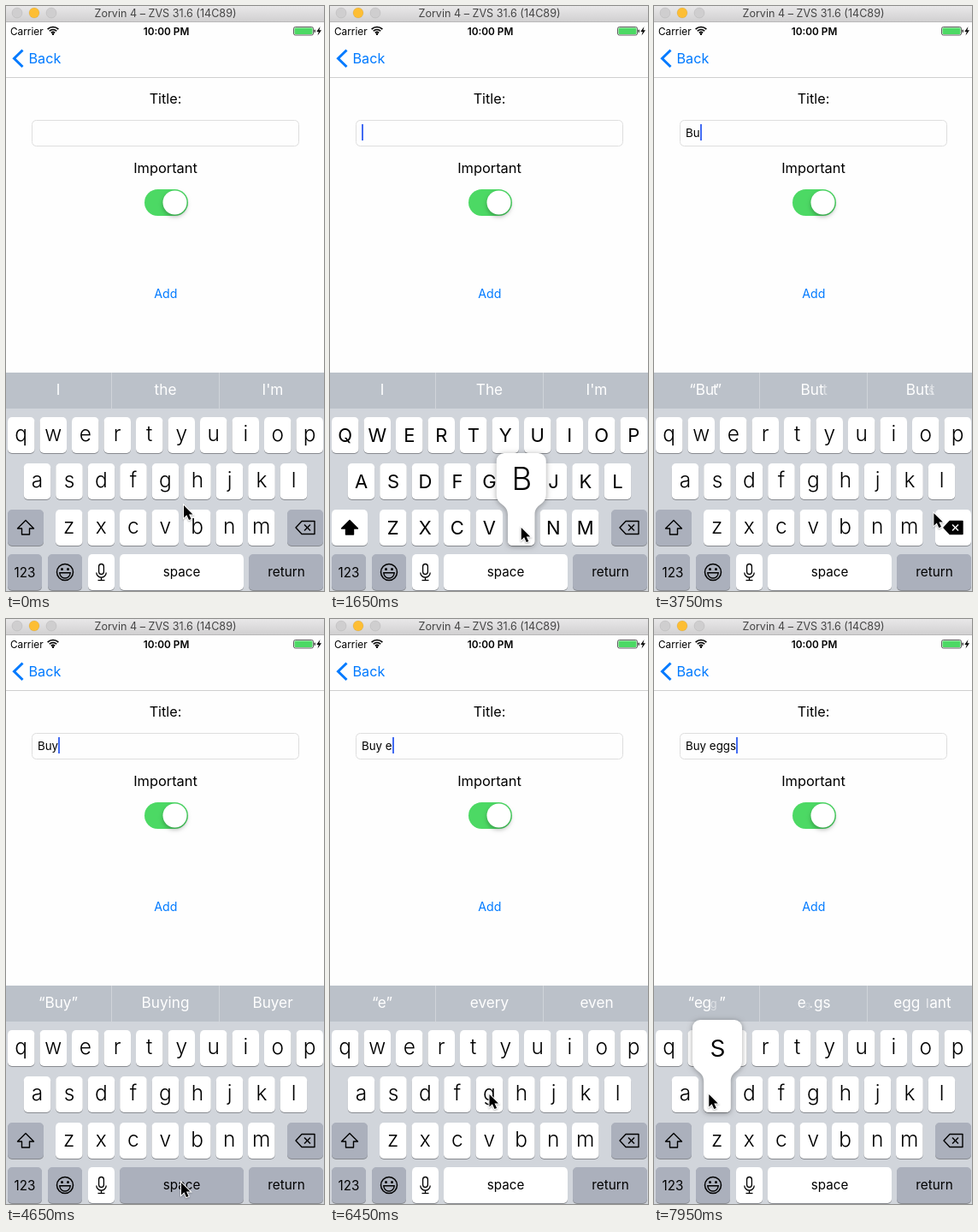
Animation, 372 px wide and 683 px high, one loop 8 s. Source, as an HTML page with a canvas:

```html
<!DOCTYPE html>
<html lang="en">
<head>
<meta charset="utf-8">
<title>New task</title>
<style>
html, body { margin: 0; width: 100%; height: 100%; overflow: hidden; background: #fff; }
canvas { display: block; width: 372px; height: 683px; }
</style>
</head>
<body>
<canvas id="stage" width="372" height="683"></canvas>
<script>
const ctx = document.getElementById('stage').getContext('2d');
const LOOP = 8000, STEP = 150, HOLD = 300, GLIDE = 750;
const FONT = 'Inter, Roboto, "Liberation Sans", sans-serif';
const BLUE = '#007aff', GREEN = '#4cd964', GRAY_KEY = '#abb0bc';
const ROWS = ['qwertyuiop', 'asdfghjkl', 'zxcvbnm'];
const ROW_X = [17.75, 36.5, 73.75], ROW_TOP = 480, ROW_GAP = 54, PITCH = 37.5;
const WIDE_KEYS = { shift: [23, 609], delete: [350, 609], space: [205, 658], return: [345, 653] };

// Key presses drive the text, the suggestions and the pointer.
const presses = [['shift', 450], ['b', 1650], ['u', 2100], ['t', 2550], ['return', 3000],
  ['delete', 3600], ['y', 4200], ['space', 4650], ['e', 5400], ['g', 6900], ['g', 7650],
  ['s', 7800], ['a', 8250]];

const suggestions = {
  '': ['I', 'the', "I'm"], shift: ['I', 'The', "I'm"], B: ['“B”', 'But', 'Be'],
  Bu: ['“Bu”', 'But', 'Buts'], But: ['“But”', 'Butt', 'Butt'], Buy: ['“Buy”', 'Buying', 'Buyer'],
  'Buy ': ['me', 'it', 'the'], 'Buy e': ['“e”', 'every', 'even'],
  'Buy eg': ['“eg”', 'e.g.', 'eggs'], 'Buy egg': ['“egg”', 'eggs', 'eggplant']
};

const lerp = (a, b, p) => a + (b - a) * p;
const clamp = p => Math.max(0, Math.min(1, p));
const smooth = p => p * p * (3 - 2 * p);
const isDown = (key, t) => presses.some(([k, at]) => k === key && t >= at && t < at + HOLD);

function keyCenter(key) {
  if (WIDE_KEYS[key]) return WIDE_KEYS[key];
  const r = ROWS.findIndex(row => row.includes(key));
  return [ROW_X[r] + ROWS[r].indexOf(key) * PITCH, ROW_TOP + r * ROW_GAP + 21];
}

function typeKey(value, key) {
  if (key === 'delete') return value.slice(0, -1);
  if (key === 'space') return value + ' ';
  if (key.length > 1) return value;
  return value + (value ? key : key.toUpperCase());
}

const history = [{ at: -LOOP, value: '', caps: false, words: suggestions[''], before: suggestions[''], since: -LOOP }];
for (const [key, time] of presses) {
  const last = history.at(-1), at = time + STEP;
  const value = typeKey(last.value, key), caps = key === 'shift';
  const words = suggestions[caps ? 'shift' : value] || last.words;
  const changed = words !== last.words;
  history.push({ at, value, caps, words,
    before: changed ? last.words : last.before, since: changed ? at : last.since });
}

const start = [208, 583];
function pointerAt(t) {
  let from = start, left = 0;
  for (const [key, at] of presses) {
    const to = keyCenter(key);
    if (t <= at) {
      const p = smooth(clamp((t - left) / Math.min(GLIDE, at - left)));
      return [lerp(from[0], to[0], p), lerp(from[1], to[1], p)];
    }
    from = to;
    left = at;
  }
  return from;
}

function text(str, x, y, size, color = '#000', align = 'center', weight = 400) {
  ctx.font = `${weight} ${size}px ${FONT}`;
  ctx.textAlign = align;
  ctx.fillStyle = color;
  ctx.fillText(str, x, y);
}

function rect(x, y, w, h, color, r = 0) {
  ctx.beginPath();
  ctx.roundRect(x, y, w, h, r);
  ctx.fillStyle = color;
  ctx.fill();
}

function dot(x, y, r, color) {
  ctx.beginPath();
  ctx.arc(x, y, r, 0, Math.PI * 2);
  ctx.fillStyle = color;
  ctx.fill();
}

function path(points, closed = true) {
  ctx.beginPath();
  points.forEach(([x, y]) => ctx.lineTo(x, y));
  if (closed) ctx.closePath();
}

function stroke(color, width) {
  ctx.strokeStyle = color;
  ctx.lineWidth = width;
  ctx.stroke();
}

function withShadow(alpha, blur, dy, draw) {
  ctx.save();
  ctx.shadowColor = `rgba(0,0,0,${alpha})`;
  ctx.shadowBlur = blur;
  ctx.shadowOffsetY = dy;
  draw();
  ctx.restore();
}

function drawBars() {
  const g = ctx.createLinearGradient(0, 0, 0, 18);
  g.addColorStop(0, '#e9e8e9');
  g.addColorStop(1, '#d1d0d1');
  rect(0, 0, 372, 18, g);
  rect(0, 18, 372, 1, '#b9b8b9');
  ['#cfcecf', '#fdbe34', '#cfcecf'].forEach((color, i) => {
    dot(13 + i * 20, 8, 6, color);
    stroke('rgba(0,0,0,.1)', 0.7);
  });
  text('Zorvin 4 – ZVS 31.6 (14C89)', 186.5, 13, 12.6, '#454545');

  text('Carrier', 5, 33.5, 11.8, '#000', 'left');
  for (let r = 3; r < 10; r += 3) {
    ctx.beginPath();
    ctx.arc(55, 33.5, r, -Math.PI * 0.75, -Math.PI * 0.25);
    stroke('#000', 1.7);
  }
  dot(55, 32.7, 1.3, '#000');
  text('10:00 PM', 187.5, 33.5, 11.8, '#000', 'center', 600);
  ctx.beginPath();
  ctx.roundRect(336.5, 24.5, 23, 9.5, 2);
  stroke('#333', 0.8);
  rect(337.5, 25.5, 21, 7.5, GREEN, 1);
  rect(360.5, 27.5, 1.4, 3.5, '#333', 1);
  path([[367.5, 24], [363.3, 30], [365.8, 30], [364.5, 34.5], [369, 28.3], [366.4, 28.3]]);
  ctx.fillStyle = '#000';
  ctx.fill();

  path([[19.5, 51.5], [9.5, 61.2], [19.5, 71]], false);
  stroke(BLUE, 3);
  text('Back', 26.5, 67, 16.2, BLUE, 'left');
  rect(0, 83, 372, 1, '#cfcfcf');
}

function drawForm(t, value) {
  text('Title:', 186.5, 114, 16.2);
  ctx.beginPath();
  ctx.roundRect(30.5, 133.5, 312, 30, 5);
  stroke('#dedede', 1);
  text(value, 37, 153, 13.35, '#000', 'left');
  const caret = Math.round(37 + ctx.measureText(value).width);
  if (t >= presses[0][1]) rect(caret, 138, 2, 19, '#426bf2');

  text('Important', 186.5, 194.5, 16.4);
  rect(162, 214, 51, 31, GREEN, 15.5);
  withShadow(0.28, 5, 2.5, () => dot(197.5, 229.5, 14, '#fff'));
  text('Add', 186.8, 340.5, 14.2, BLUE);
}

// Shared leading letters slide; the others are swapped one by one from the right.
function drawMorph(from, to, cx, p, color) {
  const y = 453.5, size = 17.2;
  if (p >= 1 || from === to) return text(to, cx, y, size, color);
  ctx.font = `400 ${size}px ${FONT}`;
  const width = str => ctx.measureText(str).width;
  const place = (word, i) => cx - width(word) / 2 + width(word.slice(0, i));
  let shared = 0;
  while (shared < to.length && to[shared] === from[shared]) shared++;
  const count = Math.max(to.length, from.length) - shared;
  const swapped = (word, i) => clamp(p * count - (word.length - 1 - i));

  const letters = [];
  [...to].forEach((ch, i) => {
    const x = place(to, i), q = swapped(to, i);
    letters.push(i < shared ? [ch, lerp(place(from, i), x, p), 1, size] : [ch, x, q, size * lerp(0.5, 1, q)]);
  });
  for (let i = shared; i < from.length; i++) letters.push([from[i], place(from, i), 1 - swapped(from, i), size]);
  letters.forEach(([ch, x, alpha, s]) => {
    ctx.globalAlpha = alpha;
    text(ch, x, y, s, color, 'left');
  });
  ctx.globalAlpha = 1;
}

function drawSuggestions(t, { words, before, since }) {
  const p = clamp((t - since + HOLD) / (2 * HOLD));
  const corrected = words[1] === 'e.g.';
  rect(0, 428, 372, 42, '#bbc1c9');
  rect(123, 428, 1, 42, '#d0d4da');
  rect(249, 428, 1, 42, '#d0d4da');
  if (corrected) rect(123, 428, 127, 42, '#ebedef');
  words.forEach((word, i) =>
    drawMorph(before[i], word, 61 + i * 125.5, p, corrected && i === 1 ? '#1f7cf0' : '#fff'));
}

function keyCap(x, y, w, color = '#fff') {
  rect(x, y + 1, w, 42, '#888b90', 5);
  rect(x, y, w, 42, color, 5);
}

function drawPopup(letter, x, y) {
  const side = 29, stem = 15.75, top = y - 66, neck = y - 18, bottom = y + 42;
  withShadow(0.35, 6, 1, () => {
    ctx.beginPath();
    ctx.moveTo(x, top);
    ctx.arcTo(x + side, top, x + side, neck, 9);
    ctx.lineTo(x + side, neck);
    ctx.bezierCurveTo(x + side, y - 5, x + stem, y - 7, x + stem, y + 6);
    ctx.arcTo(x + stem, bottom, x, bottom, 5);
    ctx.arcTo(x - stem, bottom, x - stem, y + 6, 5);
    ctx.lineTo(x - stem, y + 6);
    ctx.bezierCurveTo(x - stem, y - 7, x - side, y - 5, x - side, neck);
    ctx.arcTo(x - side, top, x, top, 9);
    ctx.closePath();
    ctx.fillStyle = '#fff';
    ctx.fill();
  });
  text(letter, x + 0.5, y - 23.5, 36.5, '#000', 'center', 300);
}

function drawShift(caps) {
  keyCap(2, 588, 42, caps ? '#fff' : GRAY_KEY);
  path([[23, 600.5], [32.5, 610], [27.5, 610], [27.5, 617], [18.5, 617], [18.5, 610], [13.5, 610]]);
  ctx.lineJoin = 'round';
  ctx.fillStyle = '#000';
  if (caps) ctx.fill();
  stroke('#000', 1.4);
  ctx.lineJoin = 'miter';
}

function drawDelete(down) {
  keyCap(329, 588, 42, down ? '#fff' : GRAY_KEY);
  path([[339, 609], [346, 601.5], [361, 601.5], [361, 616.5], [346, 616.5]]);
  ctx.lineJoin = 'round';
  ctx.fillStyle = '#000';
  if (down) ctx.fill();
  stroke('#000', 1.4);
  ctx.lineJoin = 'miter';
  for (const d of [-3.5, 3.5]) {
    path([[352.5 - d, 605.5], [352.5 + d, 612.5]], false);
    stroke(down ? '#fff' : '#000', 1.5);
  }
}

function drawBottomRow(t) {
  keyCap(2, 640, 40, GRAY_KEY);
  text('123', 22, 666.5, 15.2);

  keyCap(49, 640, 40, GRAY_KEY);
  ctx.beginPath();
  ctx.arc(69, 661, 9.5, 0, Math.PI * 2);
  stroke('#000', 1.5);
  dot(65.5, 657.5, 1.5, '#000');
  dot(72.5, 657.5, 1.5, '#000');
  ctx.beginPath();
  ctx.arc(69, 661.8, 6.2, 0, Math.PI);
  ctx.closePath();
  stroke('#000', 1.4);

  keyCap(96, 640, 31);
  ctx.beginPath();
  ctx.roundRect(108.6, 651.5, 5.8, 12, 2.9);
  stroke('#000', 1.3);
  ctx.beginPath();
  ctx.arc(111.5, 661.5, 5.7, 0, Math.PI);
  stroke('#000', 1.3);
  path([[111.5, 667], [111.5, 670.5]], false);
  stroke('#000', 1.3);
  path([[107.5, 670.5], [115.5, 670.5]], false);
  stroke('#000', 1.3);

  keyCap(133, 640, 145, isDown('space', t) ? GRAY_KEY : '#fff');
  text('space', 205.5, 665.5, 15.2);
  keyCap(284, 640, 87, GRAY_KEY);
  text('return', 328, 665.5, 15.3);
}

function drawKeyboard(t, caps) {
  const popups = [];
  rect(0, 470, 372, 213, '#d1d5db');
  for (const key of ROWS.join('')) {
    const [x, cy] = keyCenter(key), y = cy - 21;
    const label = caps ? key.toUpperCase() : key;
    keyCap(x - 15.75, y, 31.5);
    if (isDown(key, t)) popups.push([label, x, y]);
    else if (caps) text(label, x, y + 29, 22);
    else text(label, x, y + 27.5, 24.5, '#000', 'center', 300);
  }
  drawShift(caps);
  drawDelete(isDown('delete', t));
  drawBottomRow(t);
  popups.forEach(popup => drawPopup(...popup));
}

function drawPointer(t) {
  ctx.save();
  ctx.translate(...pointerAt(t));
  path([[0, 0], [0, 14.5], [3.4, 11.3], [6, 17], [8.6, 15.9], [6, 10.4], [10.5, 10.4]]);
  withShadow(0.3, 2, 1, () => stroke('#fff', 2));
  ctx.fillStyle = '#000';
  ctx.fill();
  ctx.restore();
}

function frame(now) {
  const t = Math.floor((now % LOOP) / STEP) * STEP;
  const state = history.findLast(entry => entry.at <= t);
  rect(0, 0, 372, 683, '#fefefe');
  drawBars();
  drawForm(t, state.value);
  drawSuggestions(t, state);
  drawKeyboard(t, state.caps);
  drawPointer(t);
  requestAnimationFrame(frame);
}
frame(0);
</script>
</body>
</html>
```
